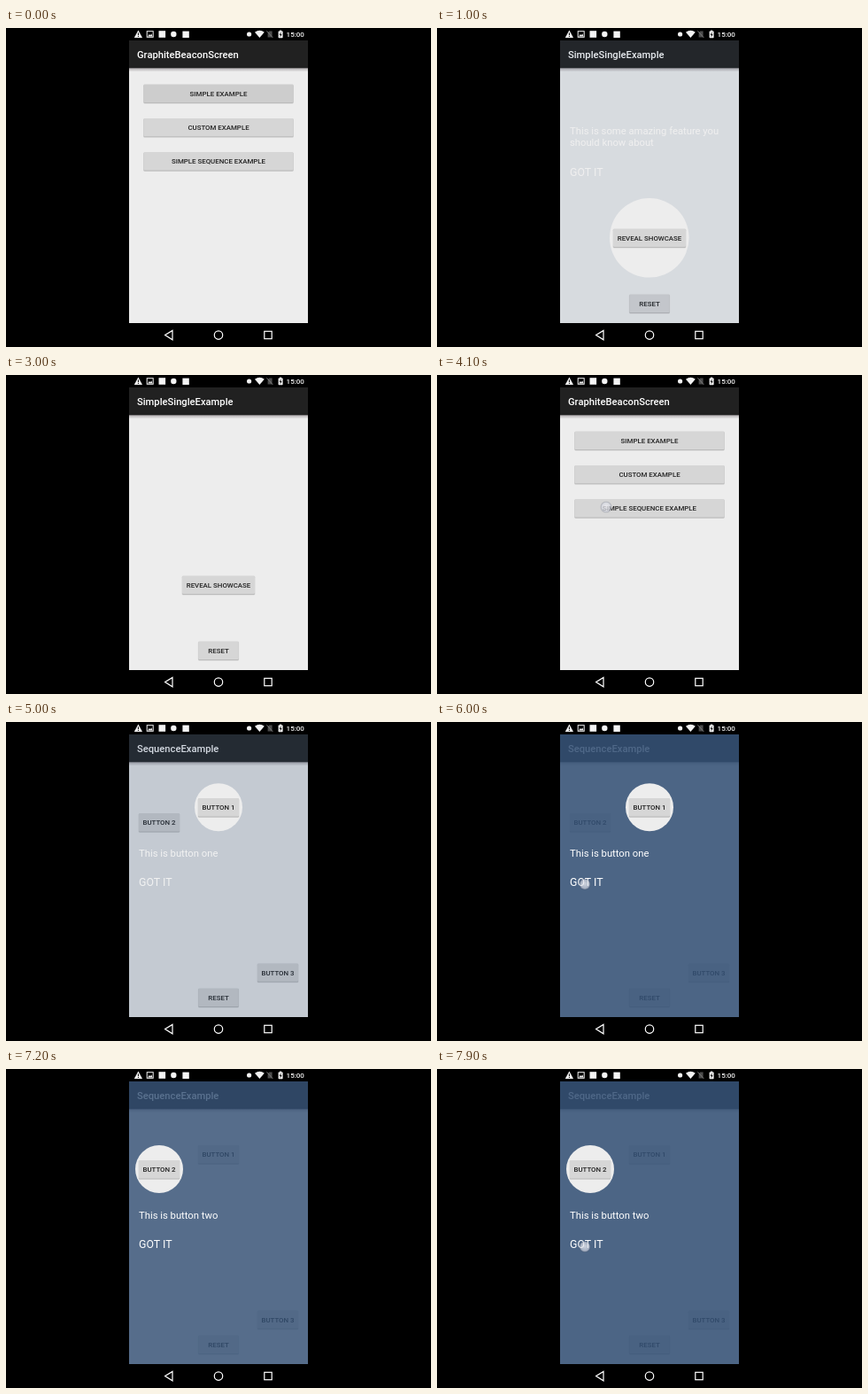
Animation of 480x360 px, one loop 8 s. Source, as an HTML page with a canvas:

```html
<!DOCTYPE html>
<html lang="en">
<head>
<meta charset="utf-8">
<title>Highlight demo</title>
<style>
html, body { margin: 0; width: 100%; height: 100%; overflow: hidden; background: #000; }
canvas { display: block; width: 480px; height: 360px; }
</style>
</head>
<body>
<canvas id="stage" width="480" height="360"></canvas>
<script>
const LOOP = 8000, STEP = 100;
const LEFT = 139, RIGHT = 341, TOP = 14, BOTTOM = 333, WIDTH = RIGHT - LEFT;
const FONT = 'Roboto, "Noto Sans", sans-serif';

const stage = document.getElementById('stage').getContext('2d');
const makeLayer = () => {
  const c = document.createElement('canvas');
  c.width = 480;
  c.height = 360;
  return c.getContext('2d');
};
const windowLayer = makeLayer(), maskLayer = makeLayer();

const clamp = v => Math.max(0, Math.min(1, v));
const smooth = v => (1 - Math.cos(Math.PI * clamp(v))) / 2;

function text(g, str, x, y, size, weight, color, align = 'left') {
  g.font = `${weight} ${size}px ${FONT}`;
  g.textAlign = align;
  g.fillStyle = color;
  g.fillText(str, x, y);
}

function disc(g, x, y, r, color) {
  g.fillStyle = color;
  g.beginPath();
  g.arc(x, y, r, 0, Math.PI * 2);
  g.fill();
}

function poly(g, points, fill, stroke) {
  g.beginPath();
  points.forEach(([x, y]) => g.lineTo(x, y));
  g.closePath();
  if (fill) { g.fillStyle = fill; g.fill(); }
  if (stroke) { g.strokeStyle = stroke; g.stroke(); }
}

function roundBox(g, x, y, w, h, r, color) {
  g.fillStyle = color;
  g.beginPath();
  g.roundRect(x, y, w, h, r);
  g.fill();
}

// Buttons are given by centre and width.
function button(g, label, cx, cy, w, pressed) {
  const x = cx - w / 2, y = cy - 10.4, h = 20.4;
  roundBox(g, x - 0.4, y + 0.4, w + 0.8, h + 1.1, 1.4, 'rgba(0,0,0,.1)');
  roundBox(g, x, y + 0.5, w, h + 0.4, 1.2, 'rgba(0,0,0,.12)');
  roundBox(g, x, y, w, h, 1.2, pressed ? '#cdcdcd' : '#d6d6d6');
  text(g, label, cx, cy + 2.8, 7.86, 500, '#202020', 'center');
}

const screens = {
  home: {
    title: 'GraphiteBeaconScreen',
    buttons: [
      ['SIMPLE EXAMPLE', 240, 74, 169],
      ['CUSTOM EXAMPLE', 240, 112.3, 169],
      ['SIMPLE SEQUENCE EXAMPLE', 240, 150.5, 169]
    ]
  },
  single: {
    title: 'SimpleSingleExample',
    buttons: [
      ['REVEAL SHOWCASE', 240, 237, 82],
      ['RESET', 240, 311, 45.5]
    ]
  },
  sequence: {
    title: 'SequenceExample',
    buttons: [
      ['BUTTON 1', 240, 96.5, 46],
      ['BUTTON 2', 173, 113.4, 46],
      ['BUTTON 3', 307, 282.8, 46],
      ['RESET', 240, 311, 45.5]
    ]
  }
};

const showcases = [
  { from: 930, to: 2660, x: 239.8, y: 236.8, r: 44.8, base: 119.9,
    lines: ['This is some amazing feature you', 'should know about'] },
  { from: 4900, to: 6130, x: 240, y: 96.2, r: 27, base: 152,
    lines: ['This is button one'] },
  { from: 6950, to: Infinity, x: 173, y: 113, r: 27, base: 169,
    lines: ['This is button two'] }
];

const touches = [
  { from: 2600, to: 2700, x: 167, y: 164 },
  { from: 3100, to: 3400, x: 185, y: 352 },
  { from: 4100, to: 4300, x: 191, y: 149 },
  { from: 6000, to: 6200, x: 167, y: 183 },
  { from: 7900, to: 8000, x: 167, y: 200.5 }
];

function drawShowcase(g, s, t) {
  const alpha = smooth((t - s.from) / 300) * (1 - smooth((t - s.to) / 300));
  if (alpha <= 0) return;
  const m = maskLayer;
  m.clearRect(0, 0, 480, 360);
  m.fillStyle = 'rgba(51,80,117,.867)';
  m.fillRect(LEFT, TOP, WIDTH, BOTTOM - TOP);
  m.globalCompositeOperation = 'destination-out';
  disc(m, s.x, s.y, s.r, '#000');
  m.globalCompositeOperation = 'source-over';
  s.lines.forEach((line, i) => text(m, line, 150, s.base + i * 13.2, 11.25, 400, '#fff'));
  text(m, 'GOT IT', 150, s.base + (s.lines.length - 1) * 13.2 + 33.4, 12.3, 400, '#fff');
  g.globalAlpha = alpha;
  g.drawImage(m.canvas, 0, 0);
  g.globalAlpha = 1;
}

function drawWindow(name, t, pressed, offset = 0, alpha = 1) {
  if (alpha <= 0) return;
  const g = windowLayer, screen = screens[name];
  g.clearRect(0, 0, 480, 360);
  g.fillStyle = '#000';
  g.fillRect(LEFT, 0, WIDTH, 360);
  g.fillStyle = '#ededed';
  g.fillRect(LEFT, TOP, WIDTH, BOTTOM - TOP);
  const shade = g.createLinearGradient(0, 45, 0, 49.5);
  shade.addColorStop(0, 'rgba(40,25,35,.32)');
  shade.addColorStop(1, 'rgba(40,25,35,0)');
  g.fillStyle = shade;
  g.fillRect(LEFT, 45, WIDTH, 5);
  g.fillStyle = '#212121';
  g.fillRect(LEFT, TOP, WIDTH, 31.3);
  text(g, screen.title, 148, 34, 11.2, 500, '#fff');
  screen.buttons.forEach((b, i) => button(g, ...b, i === pressed));
  if (name !== 'home') showcases.forEach(s => drawShowcase(g, s, t));

  stage.globalAlpha = alpha;
  stage.drawImage(g.canvas, 0, offset);
  stage.globalAlpha = 1;
}

// A new window fades in while rising; a closed one sinks and fades.
function opening(t, start) {
  const e = t - start;
  return {
    offset: 29 * (1 - clamp(e / 350)) ** 5,
    alpha: e < 0 ? 0 : 1 - (1 - clamp(e / 200)) ** 4
  };
}

function closing(t, start) {
  const e = t - start;
  return { offset: 29 * clamp(e / 250) ** 2, alpha: 1 - clamp((e - 100) / 150) };
}

function drawStatus(g) {
  const white = '#f4f4f4';
  poly(g, [[149.4, 2.6], [154, 11], [144.8, 11]], white);
  g.fillStyle = '#000';
  g.fillRect(148.9, 5.4, 1, 2.8);
  g.fillRect(148.9, 9, 1, 1);

  g.lineWidth = 1;
  g.strokeStyle = white;
  g.strokeRect(159.2, 3.7, 7, 6.6);
  poly(g, [[160.2, 9.4], [161.8, 7], [163, 8.2], [164.2, 6.4], [165.6, 9.4]], white);

  g.fillStyle = white;
  g.fillRect(172.5, 3.2, 7.6, 7.6);
  disc(g, 189.3, 7, 3.2, white);
  g.fillRect(199.4, 3.6, 7.4, 7.4);
  disc(g, 274.6, 7, 2.6, white);

  g.beginPath();
  g.moveTo(286.4, 11);
  g.lineTo(281, 4.8);
  g.quadraticCurveTo(286.4, 0.8, 291.8, 4.8);
  g.closePath();
  g.fill();

  poly(g, [[295.6, 5.2], [297.4, 3.4], [300.6, 3.4], [300.6, 10.6], [295.6, 10.6]], '#4c4c4c');
  g.strokeStyle = '#858585';
  g.lineWidth = 0.8;
  g.beginPath();
  g.moveTo(294.4, 3.2);
  g.lineTo(301.4, 11);
  g.stroke();

  roundBox(g, 307.6, 3.6, 5, 7.6, 0.6, white);
  g.fillRect(309, 2.6, 2.2, 1.2);
  poly(g, [[310.7, 4.4], [308.6, 7.8], [309.9, 7.8], [309.5, 10.4], [311.6, 6.9], [310.3, 6.9]], '#000');
  text(g, '15:00', 316.6, 10, 8, 500, white);
}

function drawNav(g) {
  g.lineWidth = 1.2;
  poly(g, [[188, 341.4], [188, 351.8], [179.6, 346.6]], null, '#fff');
  g.beginPath();
  g.arc(240, 346.6, 4.7, 0, Math.PI * 2);
  g.stroke();
  g.strokeRect(291.8, 342.3, 8.4, 8.4);
}

function drawTouch(g, { x, y }) {
  disc(g, x, y, 6.6, 'rgba(70,80,100,.14)');
  const glow = g.createRadialGradient(x, y - 0.5, 1, x, y, 6);
  glow.addColorStop(0, 'rgba(245,245,250,.72)');
  glow.addColorStop(0.75, 'rgba(230,232,240,.6)');
  glow.addColorStop(1, 'rgba(150,155,170,.5)');
  disc(g, x, y, 6, glow);
}

function draw(t) {
  stage.fillStyle = '#000';
  stage.fillRect(0, 0, 480, 360);

  let name = 'home', move = { offset: 0, alpha: 0 };
  if (t < 3480) {
    name = 'single';
    move = opening(t, 140);
  } else if (t < 3800) {
    name = 'single';
    move = closing(t, 3480);
  } else if (t >= 4380) {
    name = 'sequence';
    move = opening(t, 4380);
  }
  if (move.alpha < 1) {
    const pressed = t < 400 ? 0 : t >= 4300 ? 2 : -1;
    drawWindow('home', t, pressed, 0, 1 - 0.3 * move.alpha);
  }
  drawWindow(name, t, -1, move.offset, move.alpha);

  drawStatus(stage);
  drawNav(stage);
  touches.filter(p => t >= p.from && t < p.to).forEach(p => drawTouch(stage, p));
}

function frame(now) {
  draw(Math.floor((now % LOOP) / STEP) * STEP);
  requestAnimationFrame(frame);
}
requestAnimationFrame(frame);
</script>
</body>
</html>
```
